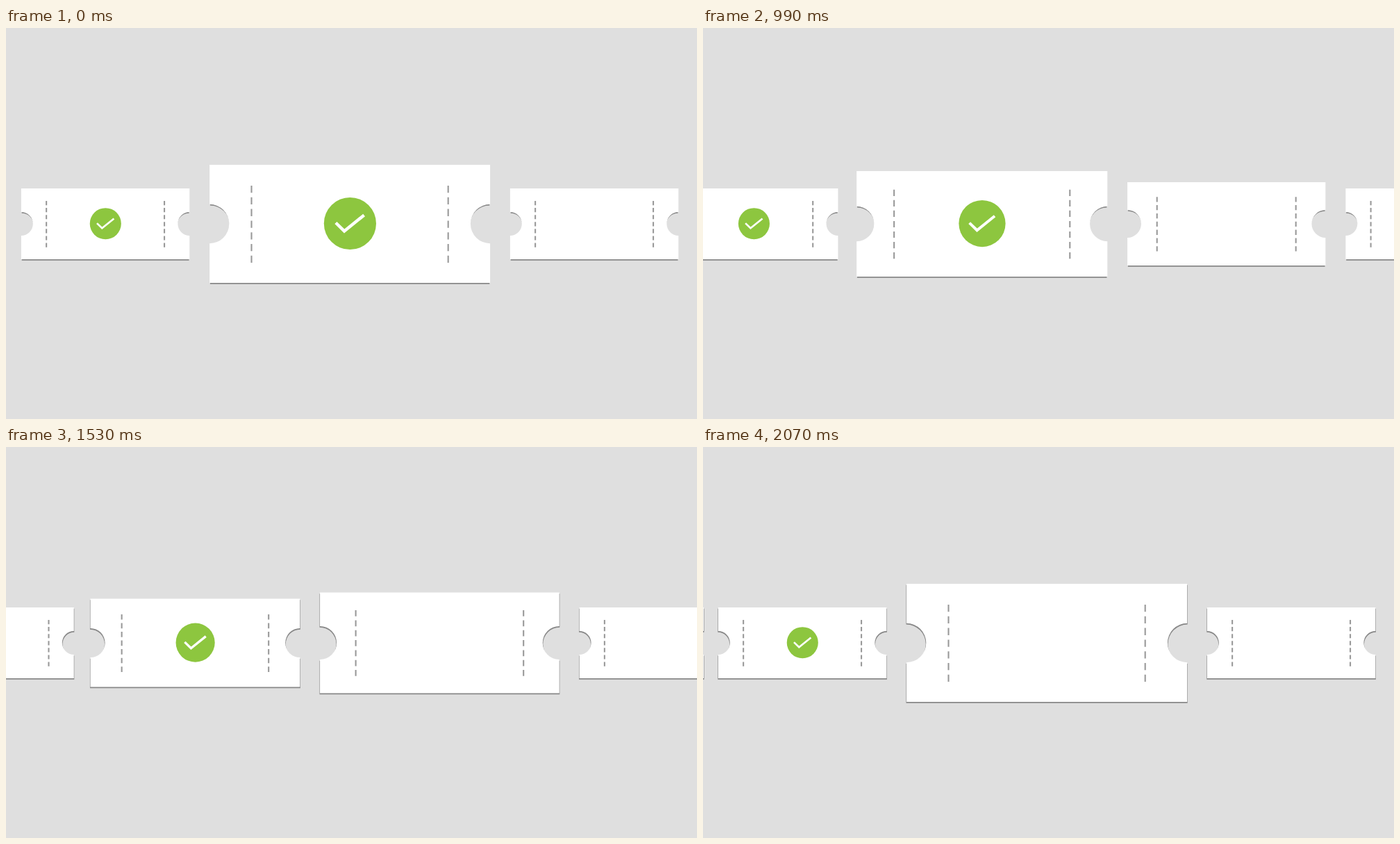
Write an HTML page that moves like this. It is 995 px wide and 563 px high and loops after 2130 ms.

```html
<!DOCTYPE html>
<html lang="en">
<head>
<meta charset="utf-8">
<title>Ticket carousel</title>
<style>
  html, body { margin: 0; width: 100%; height: 100%; overflow: hidden; background: #dfdfdf; }
  svg { display: block; width: 995px; height: 563px; }
</style>
</head>
<body>
<svg id="stage" viewBox="0 0 995 563"></svg>
<script>
const LOOP = 2130, STEP = 30, START = 600, END = 2070;
const HALF_W = 202, HALF_H = 85, NOTCH = 28.2, SMALL = 0.6;
const CENTER_Y = 282;

// Centre and scale at both ends of the slide
const tickets = [
  { x: [143.1, -120.2], scale: [SMALL, SMALL], checked: true },
  { x: [495.1, 143.1], scale: [1, SMALL], checked: true },
  { x: [847.1, 495.1], scale: [SMALL, 1], checked: false },
  { x: [1118.6, 847.1], scale: [SMALL, SMALL], checked: false }
];

const stage = document.getElementById('stage');

function add(parent, tag, attrs = {}) {
  const node = document.createElementNS('http://www.w3.org/2000/svg', tag);
  for (const key in attrs) node.setAttribute(key, attrs[key]);
  return parent.appendChild(node);
}

function outline(scale, spread = 0) {
  const w = HALF_W * scale + spread, h = HALF_H * scale, r = NOTCH * scale;
  return `M${-w} ${-h}H${w}V${-r}A${r} ${r} 0 0 0 ${w} ${r}V${h}H${-w}V${r}A${r} ${r} 0 0 0 ${-w} ${-r}Z`;
}

function perforation(scale) {
  let d = '';
  for (const x of [-141.6, 141.6])
    for (let i = 0; i < 7; i++)
      d += `M${x * scale} ${(-55 + 16.8 * i) * scale}v${10.3 * scale}`;
  return d;
}

for (const ticket of tickets) {
  const group = ticket.group = add(stage, 'g');
  ticket.shadow = add(group, 'path', { fill: '#888', transform: 'translate(0 1.7)' });
  ticket.paper = add(group, 'path', { fill: '#fff' });
  ticket.dashes = add(group, 'path', { stroke: '#999', 'stroke-width': 2.1 });
  if (ticket.checked) {
    ticket.badge = add(group, 'g');
    add(ticket.badge, 'circle', { cx: 0.3, cy: -0.5, r: 37.6, fill: '#8dc63f' });
    add(ticket.badge, 'path', {
      d: 'M-20.2 -1.5L-8 10.4L20.5 -12.6', fill: 'none', stroke: '#fff', 'stroke-width': 4.5
    });
  }
}

const mix = ([a, b], p) => a + (b - a) * p;

function draw(ms) {
  const time = Math.floor((ms % LOOP) / STEP) * STEP;
  const p = Math.min(1, Math.max(0, (time - START) / (END - START)));
  const spread = p > 0.6 ? 0.6 : -0.8;
  for (const t of tickets) {
    const scale = mix(t.scale, p);
    t.group.setAttribute('transform', `translate(${mix(t.x, p)} ${CENTER_Y})`);
    t.shadow.setAttribute('d', outline(scale, spread));
    t.paper.setAttribute('d', outline(scale));
    t.dashes.setAttribute('d', perforation(scale));
    if (t.badge) t.badge.setAttribute('transform', `scale(${scale})`);
  }
}

const origin = performance.now();
function tick() {
  draw(performance.now() - origin);
  requestAnimationFrame(tick);
}
tick();
</script>
</body>
</html>
```
